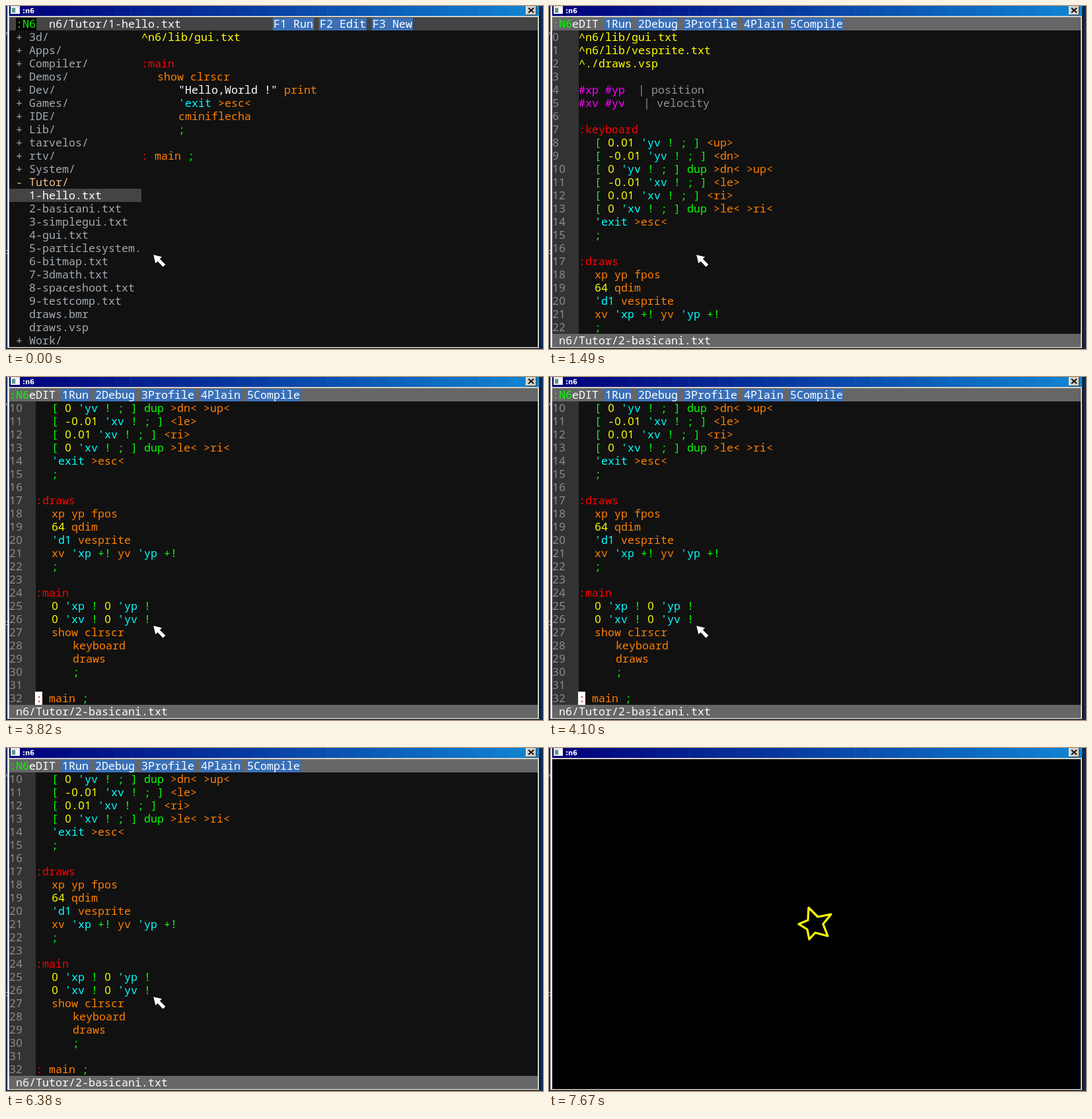
An HTML page for the animation above (8 s loop, 813 by 520 pixels).

```html
<!DOCTYPE html>
<html lang="en">
<head>
<meta charset="utf-8">
<title>Code editor</title>
<style>
  html, body { margin: 0; width: 100%; height: 100%; overflow: hidden; background: #000; }
  svg { display: block; width: 813px; height: 520px; }
  text { font: 500 16.667px "Noto Sans Mono", "DejaVu Sans Mono", monospace; white-space: pre; }
  text.digit { font-family: "Noto Sans", "DejaVu Sans", sans-serif; }
  text.small { font: 10px "DejaVu Sans", sans-serif; }
  text.title { font: bold 10px "DejaVu Sans", sans-serif; }
</style>
</head>
<body>
<svg viewBox="0 0 813 520">
  <defs>
    <clipPath id="lines"><rect x="5" y="37" width="800" height="460"/></clipPath>
  </defs>
  <g id="frame"></g>
  <g id="browser"></g>
  <g id="editor"></g>
  <g id="game">
    <rect x="5" y="17" width="800" height="500" fill="#000"/>
    <path d="M393 242L407 256L427 252L415 267L422 285L403 280L394 290L391 275L378 267L392 261Z"
      fill="none" stroke="#ff0" stroke-width="3.2" stroke-linejoin="round"/>
  </g>
  <path id="pointer" d="M222.500 376.500L237 380L233.500 383.500L242 392L237.500 396L229.500 387.500L226 391Z"
    fill="#fff" stroke="#000" stroke-width="1"/>
</svg>
<script>
const LOOP = 8000, CELL = 10, ROW = 20, TOP = 37, NARROW = 8;
const $ = id => document.getElementById(id);

// A "~" in a line is a narrow blank of 8 pixels.
const hello = `^n6/lib/gui.txt

:main
~~~show clrscr
~~~~~~~"Hello,World !" print
~~~~~~~'exit >esc<
~~~~~~~cminiflecha
~~~~~~~;

: main ;`.split("\n");

const basic = `^n6/lib/gui.txt
^n6/lib/vesprite.txt
^./draws.vsp

#xp #yp  | position
#xv #yv  ~| velocity

:keyboard
~~~[ 0.01 'yv ! ; ] <up>
~~~[ -0.01 'yv ! ; ] <dn>
~~~[ 0 'yv ! ; ] dup >dn< >up<
~~~[ -0.01 'xv ! ; ] <le>
~~~[ 0.01 'xv ! ; ] <ri>
~~~[ 0 'xv ! ; ] dup >le< >ri<
~~~'exit >esc<
~~~;

:draws
~~~xp yp fpos
~~~64 qdim
~~~'d1 vesprite
~~~xv 'xp +! yv 'yp +!
~~~;

:main
~~~0 'xp ! 0 'yp !
~~~0 'xv ! 0 'yv !
~~~show clrscr
~~~~~~~keyboard
~~~~~~~draws
~~~~~~~;

: main ;`.split("\n");

const folders = "3d Apps Compiler Demos Dev Games IDE Lib tarvelos rtv System".split(" ");
const files = ["1-hello.txt", "2-basicani.txt", "3-simplegui.txt", "4-gui.txt", "5-particlesystem.",
  "6-bitmap.txt", "7-3dmath.txt", "8-spaceshoot.txt", "9-testcomp.txt", "draws.bmr", "draws.vsp"];

const escapeText = s => s.replace(/&/g, "&amp;").replace(/</g, "&lt;").replace(/>/g, "&gt;");
const rect = (x, y, w, h, fill) => `<rect x="${x}" y="${y}" width="${w}" height="${h}" fill="${fill}"/>`;

// Text on the 10 pixel grid; y is the top of its row.
function label(x, y, s, fill) {
  let out = "";
  for (const part of s.split(/(\d)/)) {
    const digit = /^\d$/.test(part);
    if (part) out += `<text${digit ? ' class="digit"' : ""} x="${digit ? x + 0.2 : x}" y="${y + 16}" fill="${fill}">${escapeText(part)}</text>`;
    x += part.length * CELL;
  }
  return out;
}

const button = (x, s) => rect(x - 1, 18, s.length * CELL + 2, 19, "#3a70b8") + label(x, 17, s, "#fff");

function wordColor(word) {
  if (word[0] === "^") return "#ff0";
  if (word[0] === "|") return "#929292";
  if (word[0] === "#") return "#f0f";
  if (word[0] === ":") return "#f00";
  if (word[0] === "'") return "#0ff";
  if (word[0] === '"') return "#fff";
  if (/^-?\d/.test(word)) return "#ff0";
  if (/^([\[\];!]|\+!|dup)$/.test(word)) return "#0f0";
  return "#ff7f00";
}

function codeLine(line, left, y) {
  let x = left, out = "";
  for (const word of line.match(/~| |\|.*|"[^"]*"|[^ ~]+/g) || []) {
    if (word === "~") { x += NARROW; continue; }
    if (word !== " ") out += label(x, y, word, wordColor(word));
    x += word.length * CELL;
  }
  return out;
}

const codeBlock = (lines, left) => lines.map((line, i) => codeLine(line, left, TOP + i * ROW)).join("");

function drawFrame() {
  let out = rect(0, 0, 813, 520, "#0c2c5e") + rect(2, 0, 1, 519, "#d4d0c8") + rect(3, 0, 2, 519, "#fff")
    + rect(4, 0, 804, 519, "#d4d0c8") + rect(807, 0, 2, 520, "#101010") + rect(2, 518, 806, 1, "#808080")
    + rect(2, 519, 807, 1, "#101010");
  const steps = 35, width = 802 / steps;
  for (let i = 0; i < steps; i++) {
    const k = i / (steps - 1);
    out += rect(5 + i * width, 0, width + 0.5, 15, `rgb(${16 * k},${132 * k},${123 + 87 * k})`);
  }
  out += rect(7, 0, 14, 12, "#e8e8e8") + rect(9, 3, 5, 7, "#5a9a90") + rect(15, 3, 5, 7, "#fff")
    + `<text class="title" x="25" y="11" fill="#fff">:n6</text>`
    + rect(787, 0, 16, 14, "#404040") + rect(787, 0, 15, 13, "#fff") + rect(788, 0, 14, 13, "#d4d0c8")
    + `<path d="M791 3L799 10M799 3L791 10" stroke="#000" stroke-width="1.700"/>`
    + `<text class="small" x="-2" y="48" fill="#fff">f</text><text class="small" x="-2" y="376" fill="#fff">t</text>`;
  $("frame").innerHTML = out;
}

function drawBrowser(selected) {
  const gray = "#a2aab2", tutorRow = folders.length;
  const entry = (row, sign, name, color) =>
    label(15, TOP + row * ROW, sign, color) + label(35, TOP + row * ROW, name, color);
  let out = rect(5, 17, 800, 500, "#111") + rect(5, 17, 800, 20, "#444") + rect(15, 18, 31, 19, "#000")
    + label(15, 17, ":N6", "#0f0") + label(65, 17, "n6/Tutor/" + files[selected], "#fff")
    + button(405, "F1 Run") + button(475, "F2 Edit") + button(555, "F3 New")
    + rect(5, TOP + (tutorRow + 1 + selected) * ROW, 200, ROW, "#444");
  folders.forEach((name, i) => out += entry(i, "+", name + "/", gray));
  out += entry(tutorRow, "-", "Tutor/", "#efc08c");
  files.forEach((name, i) => out += entry(tutorRow + 1 + i, " ", name, i === selected ? "#fff" : gray));
  out += entry(23, "+", "Work/", gray) + codeBlock(selected ? basic.slice(0, 24) : hello, 205);
  return out;
}

function drawEditor() {
  const numbers = basic.map((_, i) => label(5, TOP + i * ROW, String(i), "#8c8c8c")).join("");
  $("editor").innerHTML = rect(5, 17, 800, 500, "#111") + rect(5, 37, 40, 460, "#333")
    + rect(5, 17, 800, 20, "#666") + rect(5, 497, 800, 20, "#666")
    + label(5, 17, ":N6", "#0f0") + label(35, 17, "eDIT", "#fff")
    + button(85, "1Run") + button(135, "2Debug") + button(205, "3Profile")
    + button(295, "4Plain") + button(365, "5Compile")
    + label(15, 497, "n6/Tutor/2-basicani.txt", "#fff")
    + `<g clip-path="url(#lines)"><g id="scroll"><rect id="caret" height="20" fill="#fff"/>${numbers}${codeBlock(basic, 45)}</g></g>`;
}

// Caret blinks: on, off, row, column
const blinks = [
  [1650, 1790, 0, 0], [2100, 2370, 0, 0], [2660, 2810, 1, 0],
  [3090, 3230, 9, 0], [3230, 3370, 14, 0], [3670, 3810, 27, 0], [3810, 3950, 32, 0],
  [4100, 4380, 32, 0], [4680, 4810, 32, 7], [5090, 5360, 32, 7],
  [5670, 5810, 32, 7], [5810, 5950, 32, 0], [6100, 6380, 31, 0],
  [6680, 6810, 22, 0], [6810, 6950, 18, 0], [7090, 7360, 14, 0]
];

const show = (node, visible) => node.setAttribute("visibility", visible ? "visible" : "hidden");

function render(t) {
  const editing = t >= 1490 && t < 7670;
  show($("browser"), t < 1490);
  show($("first"), t < 500);
  show($("second"), t >= 500 && t < 1490);
  show($("editor"), editing);
  show($("game"), t >= 7670);
  show($("pointer"), t < 7670);

  const scroll = t < 3670 ? 0 : t < 3810 ? 5 : 10;
  $("scroll").setAttribute("transform", `translate(0 ${-scroll * ROW})`);

  const blink = blinks.find(([on, off]) => t >= on && t < off);
  const caret = $("caret");
  show(caret, editing && blink);
  if (blink) {
    const [, , row, column] = blink;
    caret.setAttribute("x", 44 + column * CELL);
    caret.setAttribute("y", TOP + row * ROW);
    caret.setAttribute("width", column === 0 && basic[row][0] === "~" ? 25 : 11);
  }
}

drawFrame();
$("browser").innerHTML = `<g id="first">${drawBrowser(0)}</g><g id="second">${drawBrowser(1)}</g>`;
drawEditor();

const start = performance.now();
function tick() {
  render((performance.now() - start) % LOOP);
  requestAnimationFrame(tick);
}
render(0);
requestAnimationFrame(tick);
</script>
</body>
</html>
```
